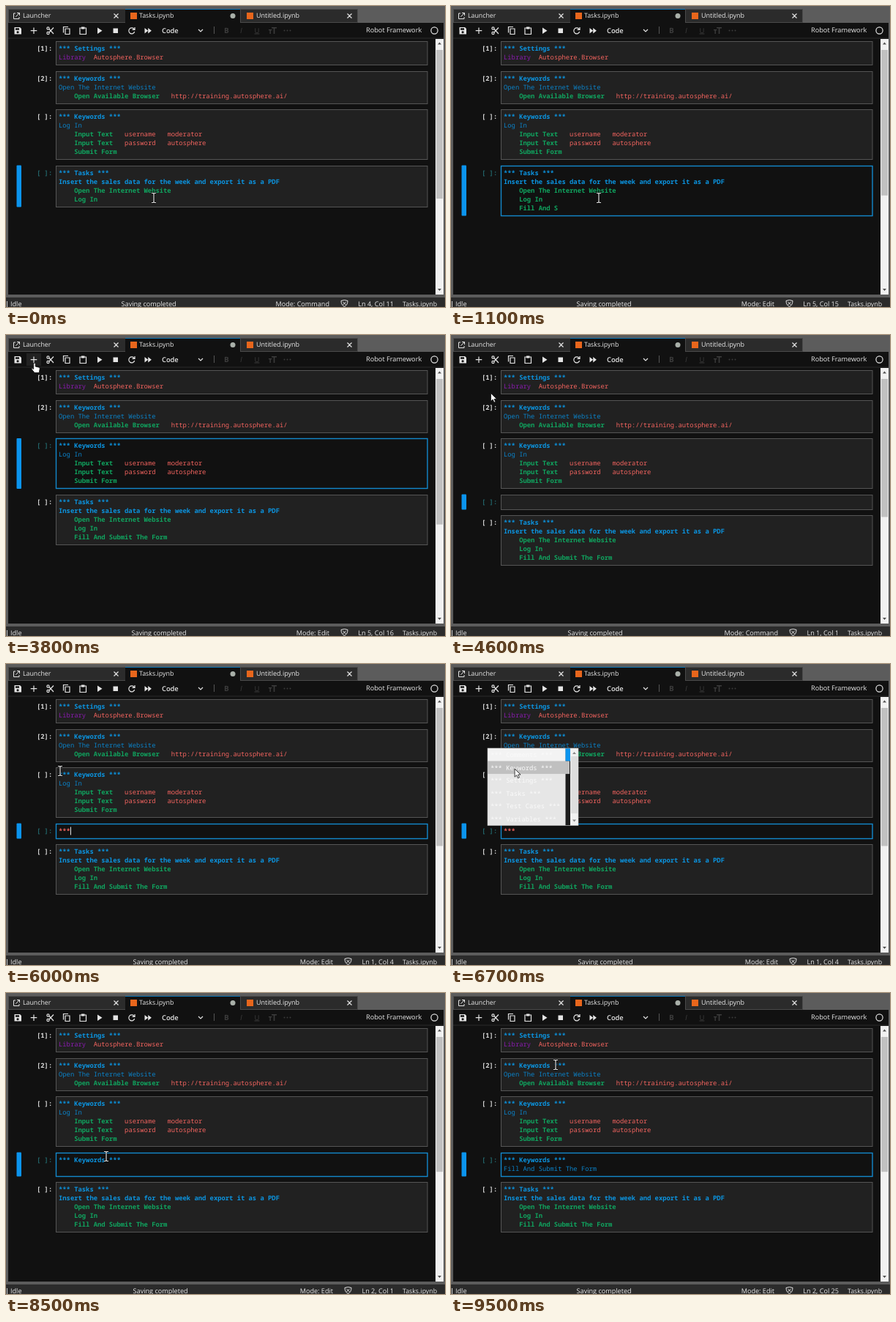
An HTML page that plays this animation: 600 by 411 pixels, repeating every 9600 ms.

```html
<!DOCTYPE html>
<html lang="en">
<head>
<meta charset="utf-8">
<title>Notebook demo</title>
<style>
html, body { margin: 0; width: 100%; height: 100%; overflow: hidden; background: #5c5c5c; }
svg { display: block; width: 600px; height: 411px; }
text { font: 9.1px "Open Sans", "Noto Sans", sans-serif; fill: #e8e8e8; text-rendering: geometricPrecision; }
.code text { font: 8.83px "Noto Sans Mono", "DejaVu Sans Mono", monospace; }
.code .h, .code .k, .code .p, .code .s { font-weight: 700; }
.code .h { fill: #0b95e2; }
.code .n { fill: #0b82c8; }
.code .k { fill: #10a45f; }
.code .a, .code .s { fill: #f4645f; }
.code .l { fill: #8a1bb0; }
.code .p { fill: #dcdcdc; }
.code .on { fill: #23676c; }
.code .o { fill: #fafafa; }
.icon { fill: none; stroke: #e4e4e4; stroke-width: 1.2; }
.solid { fill: #e4e4e4; }
.off, .off text { fill: #3c3c3c; }
</style>
</head>
<body>
<svg viewBox="0 0 600 411">
  <rect width="600" height="411" fill="#5c5c5c"/>
  <!-- tabs -->
  <rect x="3" y="23" width="595" height="371" fill="#111"/>
  <rect x="3.500" y="4.500" width="160" height="18" fill="#2b2b2b" stroke="#4a4a4a"/>
  <rect x="320.500" y="4.500" width="160" height="18" fill="#2b2b2b" stroke="#4a4a4a"/>
  <rect x="163" y="4" width="157" height="20" fill="#111"/>
  <rect x="163" y="4" width="157" height="1" fill="#0b74b4"/>
  <path class="icon" d="M13 10h-2.500v7.500h7.500v-2.500M15 9.500h3.500v3.500M18.300 9.700l-5 5" style="stroke-width:1"/>
  <text x="23" y="16.300" style="font-size:8.8px">Launcher</text>
  <rect x="170" y="9" width="9" height="9" fill="#e8661c"/>
  <text x="182" y="16.300" style="font-size:8.85px">Tasks.ipynb</text>
  <circle cx="310" cy="13.500" r="3.500" fill="#a9b0a9"/>
  <rect x="329" y="9" width="9" height="9" fill="#e8661c"/>
  <text x="342" y="16.300" style="font-size:9px">Untitled.ipynb</text>
  <path class="icon" d="M147.500 10.500l6 6m0-6l-6 6M466.500 10.500l6 6m0-6l-6 6"/>
  <!-- toolbar -->
  <rect id="hover" x="28" y="25" width="20" height="17" fill="#222"/>
  <path class="solid" fill-rule="evenodd" d="M11.500 29h7.500l2 2v7.500h-9.500zM13 30.300v2.500h5v-2.500zM16 34.200a1.600 1.600 0 1 0 .1 0z"/>
  <path class="icon" d="M38 29.500v8.500M33.700 33.700h8.600"/>
  <g class="icon">
    <circle cx="57.500" cy="30.500" r="1.600"/><circle cx="57.500" cy="37" r="1.600"/>
    <path d="M59 31.500l6 6.500M59 36l6-6.500"/>
    <path d="M81 31h6v7.500h-6zM78.500 36.500v-8h6.500"/>
    <path d="M101 30h8.500v8.500h-8.500z"/><path d="M103 30h4.500" stroke-width="3"/>
    <path d="M175.200 31.700a4 4 0 1 0 .5 3.300M176 29v3.300h-3.500"/>
    <path d="M263 32l3 3 3-3"/>
    <circle cx="585.500" cy="33.500" r="4.600"/>
  </g>
  <path class="solid" d="M125 29.500l6.500 4.200-6.500 4.200zM146.500 30.500h6.500v6.500h-6.500zM189.500 30l4.700 3.700-4.700 3.700zM194.200 30l4.700 3.700-4.700 3.700z"/>
  <text x="213" y="36.500" style="font-size:9.3px;font-weight:600">Code</text>
  <rect x="284" y="28" width="1" height="10" fill="#555"/>
  <g class="off">
    <text x="298" y="37" style="font-weight:700;font-size:10px">B</text>
    <text x="320" y="37" style="font-style:italic;font-size:10px">I</text>
    <text x="339.500" y="36.500" style="text-decoration:underline;font-size:9.500px">U</text>
    <path d="M363 29h7v1.500h-2.700v7.500h-1.600v-7.500h-2.700zM359 32h4.500v1.300h-1.600v4.700h-1.400v-4.700h-1.500z"/>
    <circle cx="380.500" cy="33.500" r="1"/><circle cx="384.500" cy="33.500" r="1"/><circle cx="388.500" cy="33.500" r="1"/>
  </g>
  <text x="492" y="36.300" style="font-size:9.2px">Robot Framework</text>
  <rect x="3" y="43.500" width="595" height="1" fill="#2c2c2c"/>
  <!-- scrollbar -->
  <rect x="587" y="45" width="11" height="349" fill="#f1f1f1"/>
  <rect id="thumb" x="588" y="60" width="9" height="203" fill="#c1c1c1"/>
  <path d="M590 52.500l2.500-3 2.500 3zM590 386l2.500 3 2.500-3z" fill="#505050"/>
  <!-- status bar -->
  <rect y="398" width="600" height="13" fill="#2b2b2b"/>
  <rect x="1" y="403" width="1" height="8" fill="#ccc"/>
  <text x="6" y="410.400">Idle</text>
  <text id="saved" y="410.400">Saving completed</text>
  <text id="mode" y="410.400" text-anchor="end"></text>
  <path id="shield" class="icon" d="M-4.500 402.500l4.500-1 4.500 1c0 4-1.500 6.500-4.500 8-3-1.500-4.500-4-4.500-8zM-2 404l4 4m0-4l-4 4" style="stroke-width:1"/>
  <text id="pos" x="530" y="410.400" text-anchor="end"></text>
  <text x="542" y="410.400" style="font-size:8.8px">Tasks.ipynb</text>
  <g id="cells" class="code"></g>
  <g id="beam" fill="none">
    <path d="M-3-6.500h2l1 1 1-1h2M0-6v12M-3 6.500h2l1-1 1 1h2" stroke="#000" stroke-width="2.600"/>
    <path d="M-3-6.500h2l1 1 1-1h2M0-6v12M-3 6.500h2l1-1 1 1h2" stroke="#e6e6e6" stroke-width="1.200"/>
  </g>
  <path id="arrow" d="M0 0v11l2.600-2.400 1.800 4 1.900-.9-1.800-3.800h3.500z" fill="#fff" stroke="#111" stroke-width=".8"/>
  <path id="hand" d="M-1.300 1q1.300-2 2.500 0v4l5 1.200q1.300.5 1 2l-1 5.300h-6.200l-4-5q.5-1.800 2.700 0z" fill="#fff" stroke="#111" stroke-width=".8"/>
</svg>
<script>
const LOOP = 9600, CH = 5.3, LINE = 12, LEFT = 72;
const PHRASE = 'Fill And Submit The Form';
const $ = id => document.getElementById(id);

// time, x, y of the pointer's hot spot
const path = [
  [0, 202, 262], [1850, 202, 262], [2200, 199, 200], [3250, 199, 200],
  [3750, 39, 38], [4450, 39, 38], [4950, 110, 228], [5400, 110, 228],
  [5950, 74, 146], [6400, 74, 146], [7150, 111, 138], [7450, 111, 138],
  [8000, 137, 223], [8600, 137, 223], [9450, 143, 98], [9600, 143, 98]
];

// time, active cell, editing
const focus = [
  [0, 'tasks', 0], [300, 'tasks', 1], [2250, 'login', 1],
  [4400, 'fresh', 0], [5000, 'fresh', 1], [5900, 'fresh', 1], [7950, 'fresh', 1]
];

const seg = (col, str, cls) => ({ col, str, cls });
const head = name => [seg(0, `*** ${name} ***`, 'h')];
const call = str => [seg(4, str, 'k')];
const input = (field, value) =>
  [seg(4, 'Input Text', 'k'), seg(17, field, 'a'), seg(28, value, 'a')];

const settings = [head('Settings'), [seg(0, 'Library', 'l'), seg(9, 'Autosphere.Browser', 'a')]];
const site = [
  head('Keywords'), [seg(0, 'Open The Internet Website', 'n')],
  [seg(4, 'Open Available Browser', 'k'), seg(29, 'http://training.autosphere.ai/', 'a')]
];
const login = [
  head('Keywords'), [seg(0, 'Log In', 'n')],
  input('username', 'moderator'), input('password', 'autosphere'), call('Submit Form')
];
const choices = ['Comments', 'Keywords', 'Settings', 'Tasks', 'Test Cases', 'Variables'];

function typed(str, t, from, to) {
  const part = Math.min(1, Math.max(0, (t - from) / (to - from)));
  return str.slice(0, Math.floor(part * str.length));
}

function tasks(t) {
  const lines = [
    head('Tasks'), [seg(0, 'Insert the sales data for the week and export it as a PDF', 'h')],
    call('Open The Internet Website'), call('Log In')
  ];
  if (t >= 400) lines.push(call(typed(PHRASE, t, 500, 1850)));
  return lines;
}

function fresh(t) {
  if (t < 7450) return [[seg(0, typed('***', t, 5400, 5850), 's')]];
  const lines = [head('Keywords')];
  if (t >= 7950) lines.push([seg(0, typed(PHRASE, t, 8550, 9300), 'n')]);
  return lines;
}

function pointer(t) {
  const i = path.findIndex(p => p[0] > t);
  const [t0, x0, y0] = path[i - 1], [t1, x1, y1] = path[i];
  const u = (t - t0) / (t1 - t0), e = u * u * (3 - 2 * u);
  return [x0 + (x1 - x0) * e, y0 + (y1 - y0) * e];
}

const rect = (x, y, w, h, fill, extra = '') =>
  `<rect x="${x}" y="${y}" width="${w}" height="${h}" fill="${fill}" ${extra}/>`;
const text = (x, y, str, cls) => `<text x="${x}" y="${y}" class="${cls}">${str}</text>`;

function drawCell(y, lines, label, active, edit) {
  const h = 21 + (lines.length - 1) * LINE, base = y + 13;
  const border = edit ? 'stroke="#1388cc" stroke-width="1.4"' : 'stroke="#555"';
  let out = rect(68.5, Math.round(y) + .5, 507.5, h - 1, edit ? '#111' : '#212121', border);
  if (active) out += rect(14.5, y, 6.5, h, '#0b94ee', 'rx="1"');
  out += text(42, base, `[${label}]:`, active ? 'p on' : 'p');
  lines.forEach((line, i) => line.forEach(s => {
    out += text(LEFT + s.col * CH, base + i * LINE, s.str, s.cls);
  }));
  return out;
}

function drawPopup(x, y) {
  const row = 17.55, top = 115;
  let out = rect(50, top, 113, 105.5, '#e6e6e6') + rect(156.5, top, 6.5, 105.5, '#1c1c1c');
  choices.forEach((name, i) => {
    const ry = top + i * row;
    if (!i) out += rect(50, ry, 106.5, row, '#f3f3f3') + rect(156.5, ry, 6.5, row, '#0b94ee');
    if (x > 50 && x < 163 && y >= ry && y < ry + row) out += rect(50, ry, 112, row, '#c0c0c0');
    out += text(54, ry + 12, `*** ${name} ***`, 'o');
  });
  out += rect(163, top, 11, 105.5, '#f1f1f1') + rect(164, 126, 9, 78, '#dedede');
  out += '<path d="M166 123l2.500-3 2.500 3zM166 212.500l2.500 3 2.500-3z" fill="#888"/>';
  return out + rect(50, top, 124, 105.5, 'none', 'stroke="#bbb" stroke-width=".6"');
}

function show(id, on, x, y) {
  $(id).style.display = on ? '' : 'none';
  if (on) $(id).setAttribute('transform', `translate(${x.toFixed(2)} ${y.toFixed(2)})`);
}

let last = '';
function render(t) {
  const [since, active, edit] = focus.filter(f => f[0] <= t).pop();
  const [x, y] = pointer(t);
  const popup = t >= 6700 && t < 7450;
  const cells = [['settings', settings, 1], ['site', site, 2], ['login', login, ' ']];
  if (t >= 4400) cells.push(['fresh', fresh(t), ' ']);
  cells.push(['tasks', tasks(t), ' ']);

  let out = '', top = 48.3, ln = 1, col = 1;
  for (const [name, lines, label] of cells) {
    const on = name === active, rows = lines.length - 1;
    out += drawCell(top, lines, label, on, on && edit);
    if (on) {
      const end = lines[rows].slice(-1)[0];
      ln = rows + 1;
      col = end.col + end.str.length + 1;
      if (edit && (t - since) % 1000 < 500)
        out += rect(LEFT + (col - 1) * CH, top + 5 + rows * LINE, 1, 11, '#eee');
    }
    top += 28.4 + rows * LINE;
  }
  if (popup) out += drawPopup(x, y);
  if (out !== last) $('cells').innerHTML = last = out;

  const short = col < 10 ? 1 : 0;
  $('mode').textContent = 'Mode: ' + (edit ? 'Edit' : 'Command');
  $('mode').setAttribute('x', 442 + 5 * short);
  $('saved').setAttribute('x', 157.6 + (edit ? 14 : 0) + 2 * short);
  $('shield').setAttribute('transform', `translate(${462.5 + 5 * short} 0)`);
  $('pos').textContent = `Ln ${ln}, Col ${col}`;
  $('thumb').setAttribute('height', 203 - .36 * (top - 282));

  const hand = y < 47 && x < 50, arrow = !hand && (popup || x < 68);
  show('hand', hand, x, y);
  show('arrow', arrow, x, y);
  show('beam', !hand && !arrow, x, y);
  $('hover').style.display = hand ? '' : 'none';
}

const start = performance.now();
function tick(now) {
  render(Math.max(0, now - start) % LOOP);
  requestAnimationFrame(tick);
}
render(0);
requestAnimationFrame(tick);
</script>
</body>
</html>
```
